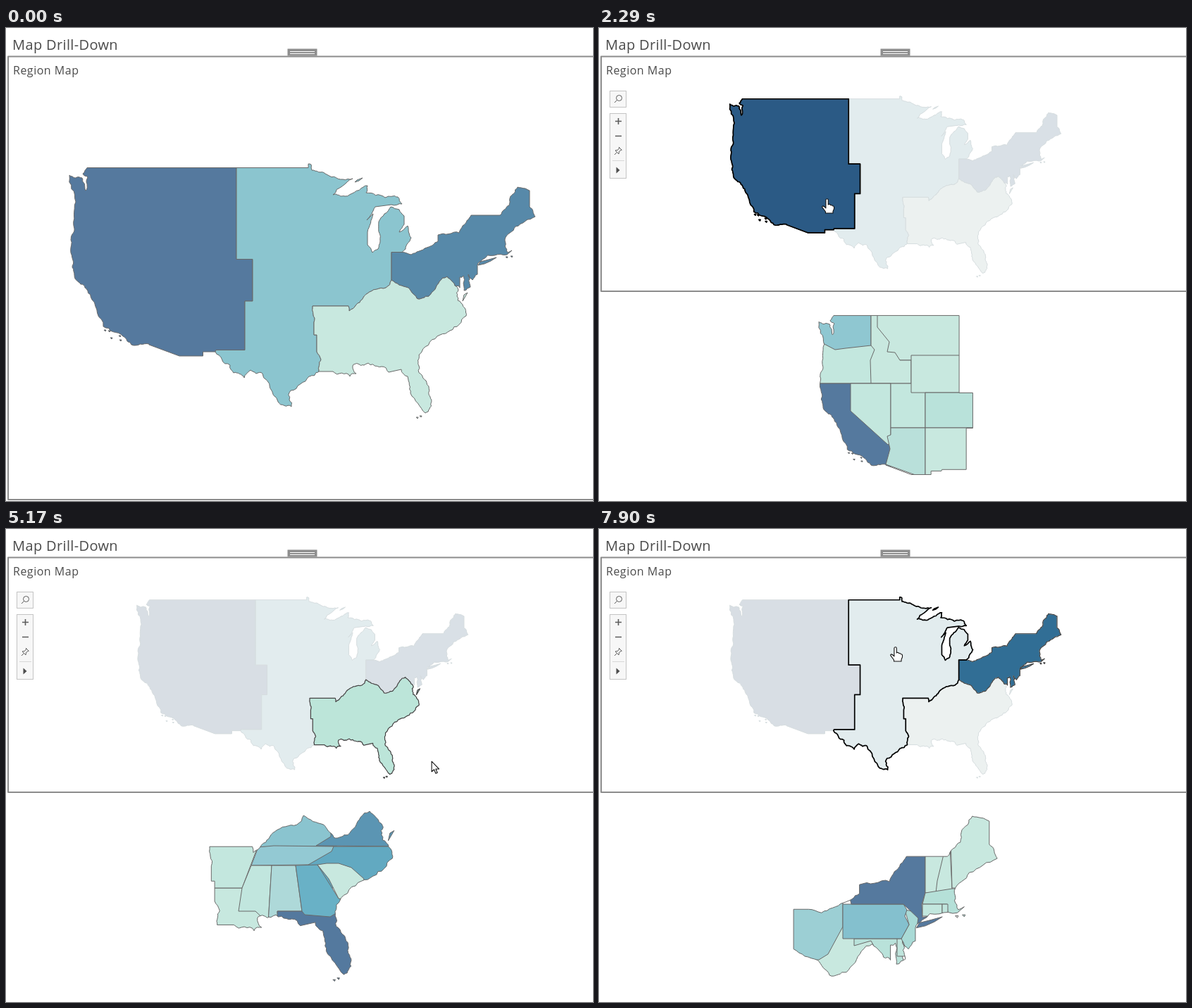
Write an HTML page that moves like this. It is 833 px wide and 672 px high and loops after 7.99 s.

```html
<!DOCTYPE html>
<html lang="en">
<head>
<meta charset="utf-8">
<title>Map Drill-Down</title>
<style>
html, body { margin: 0; width: 100%; height: 100%; overflow: hidden; background: #fff; }
svg { display: block; width: 833px; height: 672px; }
text { font-family: "Open Sans", "Noto Sans", sans-serif; fill: #4b4b4b; }
path, polygon { vector-effect: non-scaling-stroke; stroke-linejoin: round; }
.line { fill: none; stroke: #696969; }
#frame { fill: none; stroke: #8c8c8c; stroke-width: 2; }
#picked { fill: none; stroke: #444; stroke-width: 1.2; }
#hover { fill: none; stroke: #000; stroke-width: 1.7; }
#tools rect { fill: #f7f7f7; stroke: #c4c4c4; }
#tools path, #tools circle { fill: none; stroke: #5c5c5c; }
#cursor path { fill: #fff; stroke: #111; stroke-width: 1.1; }
</style>
</head>
<body>
<svg id="stage" viewBox="0 0 833 672">
  <defs>
    <clipPath id="pane"><rect id="paneRect" width="833" height="669"/></clipPath>
  </defs>
  <text x="9" y="31" font-size="20" letter-spacing=".35">Map Drill-Down</text>
  <text x="10" y="66" font-size="16" letter-spacing=".5">Region Map</text>
  <path fill="#8e8e8e" d="M399.500 29.500h42v10h-42z"/>
  <path stroke="#fff" d="M403 33.500h35M403 36.500h35"/>
  <g clip-path="url(#pane)">
    <g id="map"><g id="regions"></g><path id="picked"/><path id="hover"/></g>
  </g>
  <path id="frame"/>
  <g id="details"></g>
  <g id="tools">
    <rect x="15.5" y="89.5" width="23" height="23"/>
    <rect x="15.5" y="121.5" width="23" height="92"/>
    <circle cx="28.5" cy="99.5" r="4"/>
    <path d="M25.5 102.5L22 106"/>
    <path stroke-width="1.6" d="M23 132.500h9M27.500 128v9M23 153.500h9"/>
    <path d="M28 169l4.500 4.500M29 170l-2.500 3.500-3.500.5 5 5 .5-3.500 3.500-2.500M25.500 176.500L22 180"/>
    <path style="stroke:#d8d8d8" d="M19 188.500h17"/>
    <path style="fill:#4d4d4d;stroke:none" d="M24.500 197.500v9l5-4.500z"/>
  </g>
  <g id="cursor">
    <path id="hand" transform="translate(-1.3)" d="M-1.800 12V1.500a1.700 1.700 0 0 1 3.400 0V8l1-.7 1.800.5.6.8 2 .2.6.9 1.500.3.700 1.100V14l-1.500 3.500V20H-2.200V18L-6.600 12.200q-1-1.800.6-2.300 1.600 0 4.200 3z"/>
    <path id="arrow" d="M0 0V14.500L3.400 11.500 5.800 17 8.100 16 5.800 10.700H10.400Z"/>
  </g>
</svg>
<script>
const LOOP = 7990;
const $ = id => document.getElementById(id);
const add = (parent, tag, attrs) => {
  const el = document.createElementNS('http://www.w3.org/2000/svg', tag);
  for (const k in attrs) el.setAttribute(k, attrs[k]);
  parent.append(el);
  return el;
};

let seed = 7;
const random = () => (seed = seed * 16807 % 2147483647) / 2147483647;
const read = text => text.split(' ').map(p => p.split(',').map(Number));

// Midpoint displacement gives natural borders; edges along the grid stay straight
function rough(text, amount = .3) {
  let pts = read(text);
  for (let pass = 0; pass < 3; pass++) {
    pts = pts.flatMap((p, i) => {
      const q = pts[i + 1];
      if (!q) return [p];
      const dx = q[0] - p[0], dy = q[1] - p[1], len = Math.hypot(dx, dy);
      if (!dx || !dy || len < 4) return [p];
      const push = (random() - .5) * amount * Math.min(1, 14 / len);
      return [p, [(p[0] + q[0]) / 2 - dy * push, (p[1] + q[1]) / 2 + dx * push]];
    });
  }
  return pts;
}
const flip = pts => [...pts].reverse();
const outline = (...parts) => 'M' + parts.flat().map(p => p.map(v => v.toFixed(1))).join(' ') + 'Z';
const islets = text => read(text).map(([x, y]) => `M${x} ${y}l3 0-1 2z`).join('');
const box = (l, t, r, b) => `${l},${t} ${r},${t} ${r},${b} ${l},${b}`;

// Borders shared by two regions
const westCentral = read('327,198.5 327,328.5 350,328.5 350,388 339,388 339,457.5 298,457.5 297,460');
const centralSouth = rough('547,358 539,369 513,377 497,393 487,402 486,395 435,395 437,418 437,436 441,436 441,460 447,471 444,488');
const southEast = rough('547,358 571,369 583,384 600,381 615,360 626,353 637,366');

const southwest = read('279.5,460 279.5,466 246,466 203,450');
const pacific = rough('203,449 178,450 166,438 138,424 122,386 115,372 103,361 94,340 95,330 92,301 97,285 99,247 90,209 108,213 113,231 116,212 109,207 115,198.5');
const superior = rough('429,198.5 429,193 433,194 434,202 453,207 478,215 492,214 464,237 481,239 507,226 513,224 511,234 538,241 556,240 562,250 547,251');
const michigan = rough('524,254 512,273 521,264 513,290 513,308 520,319 528,314 531,303 529,275 537,264 546,254 558,258 565,267 565,279 558,290 570,281 575,298 567,314 562,318.5 547,318.5', .2);
const texas = rough('444,488 430,495 404,515 402,528 405,538 386,531 364,491 347,486 338,497 323,490 318,479 297,460', .4);
const atlantic = rough('637,366 642,372 640,381 646,391 653,409 630,430 616,436 590,460 586,480 596,501 602,524 601,541 595,547 574,519 570,495 561,485', .4);
const gulf = rough('543,489 533,481 508,479 492,480 497,491 488,495 464,488 444,488', .5);
const northeast = rough('547,318.5 562,318.5 575,322 597,312 613,303 613,294 643,291 648,281 660,266 701,266 714,252 715,242 726,226 743,231 743,254 751,268 723,282 708,300 712,319 718,316');
const eastShore = rough('711,322 676,329 669,337 669,350 662,358 656,350 659,368 650,373 649,352 644,354 644,369 637,366', .5);

const mint = '#c8e8df', sage = '#c3e7de', navy = '#55799e';

// State shapes are painted in order and clipped to their region
const regions = {
  west: {
    d: outline(westCentral, southwest, pacific) + islets('139,429 145,430 148,440 160,437 161,443'),
    fill: navy, faded: '#d8dee4', dark: '#2b5a85',
    place: [.84, .845, 236.4, 240.7],
    parts: [
      [mint, box(390, 400, 520, 472)],
      [sage, box(300, 440, 392, 505)],
      ['#8fc7d1', '300,400 386,400 386,451 350,455 335,457 316,447 300,447'],
      [mint, '386,400 395,400 395,425 412,446 409,460 420,461 427,472 443,472 443,505 386,505 385,472 391,457 386,451'],
      [navy, box(300, 505, 414, 640)],
      [sage, '357,505 414,505 414,590 410,592 357,544'],
      [sage, box(414, 505, 463, 568)],
      [mint, box(443, 465, 520, 518)],
      ['#b9e0da', '414,568 463,568 463,640 407,620 413,598 409,580 414,578'],
      ['#b9e2da', box(463, 518, 540, 568)],
      [mint, box(463, 568, 540, 640)]
    ]
  },
  central: {
    d: outline(flip(westCentral), superior, michigan, centralSouth, texas) + 'M495 219l3-3 8-3-5 4z',
    fill: '#8bc5cf', faded: '#e2ecee'
  },
  south: {
    d: outline(flip(centralSouth), southEast, atlantic, gulf) + 'M648 388l2-9 5-3-4 7z' + islets('582,553 587,551'),
    fill: mint, faded: '#ecf1f0', dark: '#bce5d9',
    place: [1.19, 1.196, -228.7, -21.2],
    parts: [
      ['#c7e8df', box(280, 510, 375, 590)],
      [sage, '280,440 357,440 357,452 335,510 280,510'],
      ['#8ac4cf', '357,395 470,395 470,450 357,452'],
      ['#5b95b3', '461,390 565,390 565,451 440,450 461,437'],
      ['#62a9c1', box(429, 451, 565, 510)],
      ['#93c9d3', '358,452 380,450 465,451 462,458 429,477 348,478'],
      ['#c1e6de', '348,478 377,478 372,560 354,543 330,543 335,510'],
      ['#aed9d9', '377,478 411,478 420,543 385,543 387,560 372,560'],
      ['#54799e', box(385, 543, 500, 650)],
      ['#69b1c6', '411,478 442,477 472,525 490,530 468,546 460,551 424,548 420,543'],
      [mint, '442,477 455,475 472,475 490,481 508,497 500,530 472,525 458,497']
    ]
  },
  east: {
    d: outline(northeast, eastShore, flip(southEast)) + 'M670 337l3-5 12-3 11-3-8 5-9 4z' + islets('709,325 716,324'),
    fill: '#5789a9', faded: '#d9e0e6', dark: '#316e95',
    place: [1.417, 1.43, -499, 84.8],
    parts: [
      [mint, box(300, 540, 395, 640)],
      ['#9ccfd4', '270,530 346,530 346,565 325,604 312,612 270,615'],
      ['#b9e2da', '362,582 423,582 440,640 405,620 386,585 362,592'],
      ['#c0e5dd', box(423, 582, 445, 607)],
      ['#a9dad6', '434,541 456,545 456,580 440,605 429,582 440,562'],
      ['#84c0ce', '346,533 432,533 437,541 434,550 440,562 429,582 346,582'],
      [navy, '358,533 350,500 420,450 463,450 463,517 458,533 459,552 490,545 490,560 450,572 453,553 432,533'],
      [mint, box(463, 460, 492, 517)],
      [mint, '492,450 498,450 501,512 478,517 480,500'],
      [mint, '498,400 575,400 575,512 501,510'],
      ['#b5e0d8', '463,517 501,511 530,511 530,555 495,545 494,533 459,533'],
      [sage, box(459, 533, 487, 550)],
      ['#c0e5dd', box(487, 533, 495, 549)]
    ]
  }
};

for (const [name, r] of Object.entries(regions)) {
  r.shape = add($('regions'), 'path', { d: r.d });
  if (!r.parts) continue;
  const [sx, sy, x, y] = r.place;
  const transform = `matrix(${sx} 0 0 ${sy} ${x} ${y})`;
  const clip = add(document.querySelector('defs'), 'clipPath', { id: name + 'Clip' });
  add(clip, 'path', { d: r.d, transform });
  r.detail = add($('details'), 'g');
  const states = add(r.detail, 'g', { 'clip-path': `url(#${name}Clip)` });
  for (const [fill, points] of r.parts) add(states, 'polygon', { points, fill, stroke: '#696969' });
  add(r.detail, 'path', { d: r.d, transform, class: 'line' });
}

// start, layout, selected region, time at which a busy view drops the hand pointer
const scenes = [
  [0, 'full'], [1360, 'cut', '', 1360], [1430, 'split', 'west'], [2670, 'full'],
  [3700, 'full', '', 3780], [4010, 'cut', '', 3780], [4860, 'split', 'south'],
  [6800, 'split', 'south', 6950], [7120, 'split', 'east']
];

// Pointer legs: start, end, x, y
const entry = [697, 640];
const legs = [
  [70, 510, 407, 440], [660, 740, 401, 435], [740, 1200, 250, 338], [1760, 2290, 325, 243],
  [2670, 2910, 336, 239], [2910, 3380, 520, 430], [4010, 4480, 644, 367], [4860, 5640, 530, 262],
  [5700, 6190, 556, 188], [7200, 7500, 505, 240], [7500, 7900, 422, 168]
];

const pointerAt = t => legs.reduce(([x, y], [from, to, nx, ny]) => {
  const p = Math.min(1, Math.max(0, (t - from) / (to - from)));
  const e = p * p * (3 - 2 * p);
  return [x + (nx - x) * e, y + (ny - y) * e];
}, entry);

function render(t) {
  const [, layout, selected, busy] = scenes.filter(s => s[0] <= t).pop();
  const full = layout === 'full', small = layout === 'split';
  const [scale, dx, dy] = small ? [.711, 121.7, -40.4] : [1, 0, 0];
  const [x, y] = pointerAt(t), active = t >= 70;

  $('frame').setAttribute('d', `M834 40.500H3V${full ? 670 : 374}H834`);
  $('paneRect').setAttribute('height', full ? 669 : 370);
  $('map').setAttribute('transform', `matrix(${scale} 0 0 ${scale} ${dx} ${dy})`);

  const spot = $('stage').createSVGPoint();
  spot.x = (x - dx) / scale;
  spot.y = (y - dy) / scale;
  let over = null;
  for (const [name, r] of Object.entries(regions)) {
    const on = name === selected;
    r.shape.setAttribute('fill', on ? r.dark : selected ? r.faded : r.fill);
    r.shape.setAttribute('stroke', selected ? '#d6dddf' : '#696969');
    if (r.detail) r.detail.style.display = on ? '' : 'none';
    if (active && !busy && r.shape.isPointInFill(spot)) over = r;
  }
  $('picked').setAttribute('d', selected ? regions[selected].d : '');
  $('hover').setAttribute('d', over ? over.d : '');

  const hand = over || t < busy;
  $('tools').style.display = $('cursor').style.display = active ? '' : 'none';
  $('hand').style.display = hand ? '' : 'none';
  $('arrow').style.display = hand ? 'none' : '';
  $('cursor').setAttribute('transform', `translate(${x} ${y})`);
}

const start = performance.now();
function tick() {
  render((performance.now() - start) % LOOP);
  requestAnimationFrame(tick);
}
tick();
</script>
</body>
</html>
```
